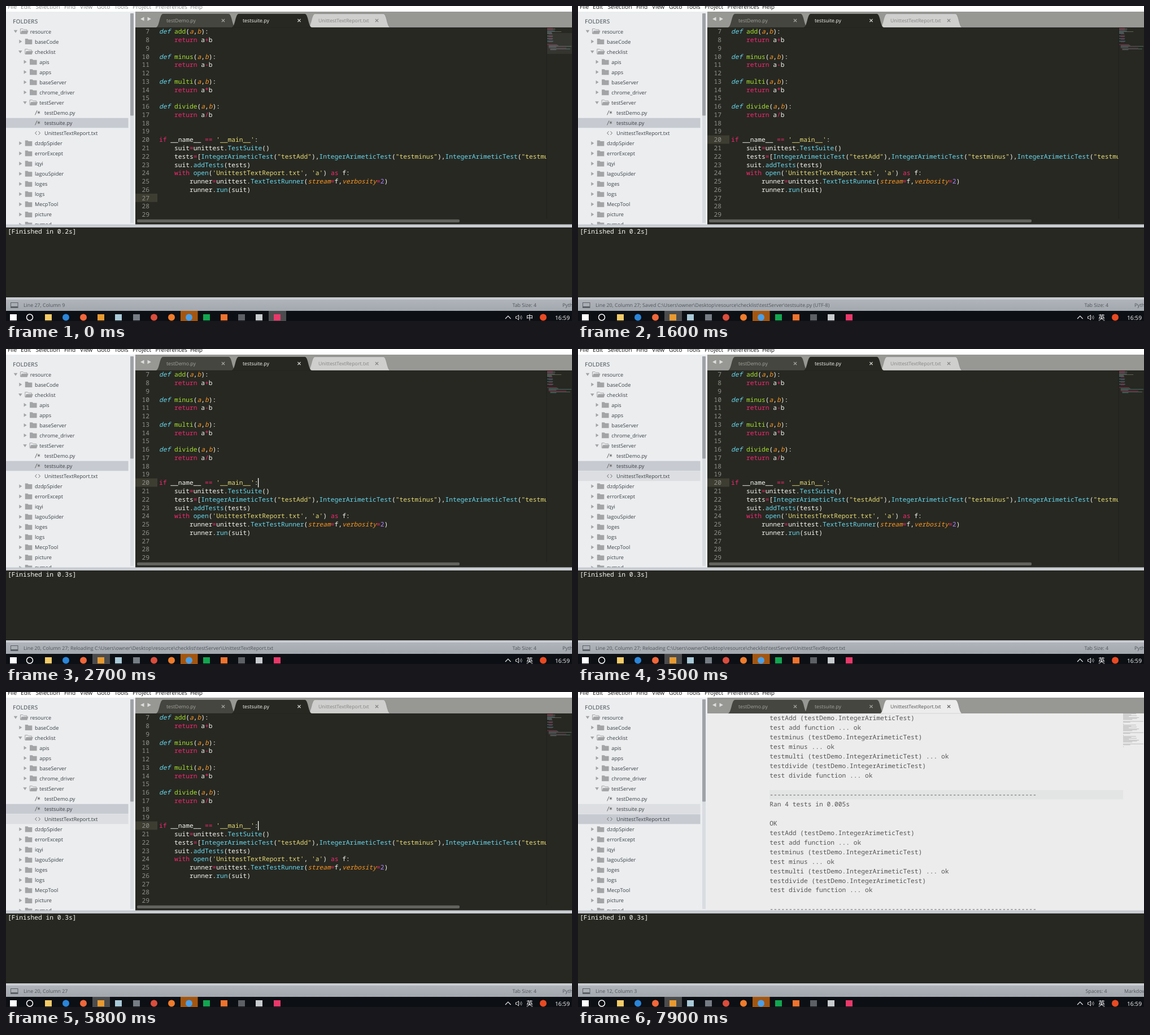
Recreate the animation shown at these times as an HTML page. Size 1002 px wide and 559 px high, loop 8 s.

```html
<!DOCTYPE html>
<html lang="en">
<head>
<meta charset="utf-8">
<title>Editor session</title>
<style>
html, body { margin: 0; width: 100%; height: 100%; overflow: hidden; background: #272822; }
svg { display: block; }
text { white-space: pre; text-rendering: geometricPrecision; font-family: 'Open Sans', 'Noto Sans', sans-serif; }
.mono text { font-family: 'Noto Sans Mono', 'DejaVu Sans Mono', monospace; font-size: 11.25px; }
.code { fill: #f8f8f2; }
.menu { font-size: 10.2px; }
.tree { font-size: 9.2px; fill: #3c4146; }
.tab { font-size: 8.75px; }
.status { font-size: 8.8px; fill: #4f545a; }
.cjk { font-family: 'Noto Sans CJK SC', 'Noto Sans CJK JP', sans-serif; font-size: 12px; font-weight: 500; fill: #fff; }
.k { fill: #f92672; }
.d { fill: #66d9ef; font-style: italic; }
.b { fill: #66d9ef; }
.g { fill: #a6e22e; }
.o { fill: #fd971f; font-style: italic; }
.s { fill: #e6db74; }
.n { fill: #ae81ff; }
</style>
</head>
<body>
<svg id="stage" width="1002" height="559" viewBox="0 0 1002 559"></svg>
<script>
const LOOP = 8000, STEP = 100, CHAR = 6.75;
const rect = (x, y, w, h, fill, more = '') =>
  `<rect x="${x}" y="${y}" width="${w}" height="${h}" fill="${fill}" ${more}/>`;
const circle = (x, y, r, fill, more = '') =>
  `<circle cx="${x}" cy="${y}" r="${r}" fill="${fill}" ${more}/>`;
const path = (d, fill, more = '') => `<path d="${d}" fill="${fill}" ${more}/>`;
const esc = s => s.replace(/&/g, '&amp;').replace(/</g, '&lt;').replace(/>/g, '&gt;');
const text = (x, y, s, more = '') => `<text x="${x}" y="${y}" ${more}>${esc(s)}</text>`;
const group = (id, body, more = '') => `<g id="${id}" ${more}>${body}</g>`;

// Menu bar
const MENU = [['File', 3], ['Edit', 26], ['Selection', 52.5], ['Find', 103], ['View', 131],
  ['Goto', 161], ['Tools', 192], ['Project', 224], ['Preferences', 264.5], ['Help', 326]];
const menu = () => rect(0, 0, 1002, 10, '#fff') +
  group('menu', MENU.map(([s, x]) => text(x, 5.3, s)).join(''), 'class="menu"');

// Sidebar: [level, kind, label]; + open folder, - closed folder, / and < files
const TREE = [
  [0, '+', 'resource'], [1, '-', 'baseCode'], [1, '+', 'checklist'], [2, '-', 'apis'],
  [2, '-', 'apps'], [2, '-', 'baseServer'], [2, '-', 'chrome_driver'], [2, '+', 'testServer'],
  [3, '/', 'testDemo.py'], [3, '/', 'testsuite.py'], [3, '<', 'UnittestTextReport.txt'],
  [1, '-', 'dzdpSpider'], [1, '-', 'errorExcept'], [1, '-', 'iqyi'], [1, '-', 'lagouSpider'],
  [1, '-', 'loges'], [1, '-', 'logs'], [1, '-', 'MecpTool'], [1, '-', 'picture'], [1, '-', 'pymod']];
const ROW = 18.05;

function treeRow([level, kind, label], i) {
  const y = 45 + i * ROW, x = 17 + level * 8.3;
  const name = text(level === 3 ? 68 : x + 25.7, y + 3.5, label);
  if (kind === '/') return path(`M51.5 ${y + 4}l3.6-8`, 'none', 'stroke="#666"') +
    path(`M58 ${y - 3}v5M55.8 ${y - 1.8}l4.4 2.6M60.2 ${y - 1.8}l-4.4 2.6`, 'none', 'stroke="#666" stroke-width=".9"') + name;
  if (kind === '<') return path(`M54.5 ${y - 3}l-3 3 3 3M57.5 ${y - 3}l3 3-3 3`, 'none', 'stroke="#666"') + name;
  const fx = x + 7.5, grey = '#a2a4a6';
  if (kind === '-') return path(`M${x - 2} ${y - 3.3}l5 3.3-5 3.3z`, grey) +
    path(`M${fx + 1} ${y - 5}h4.5l1.5 1.5h6.5v8.500h-12.500z`, grey) + name;
  return path(`M${x - 3.3} ${y - 2.2}h6.600l-3.300 5z`, grey) +
    path(`M${fx + 1} ${y + 4}v-8.500h4.500l1.500 1.500h5.500v2`, 'none', `stroke="${grey}"`) +
    path(`M${fx + 1} ${y + 4.8}l2-6h12l-2 6z`, grey) + name;
}

const sidebar = () => rect(0, 10, 229, 378, '#ebedef') +
  rect(220, 13, 6, 372, '#d9dce0') + rect(220, 13, 6, 181.5, '#9fa3a8', 'rx="1"') +
  rect(0, 0, 216.5, 17.5, '#dcdee1', 'id="hover"') + rect(0, 0, 216.5, 17.5, '#c7cbd1', 'id="picked"') +
  text(12, 31, 'FOLDERS', 'font-size="10.2" font-weight="600" fill="#6a7076"') +
  group('tree', TREE.map(treeRow).join(''), 'class="tree"');

// Tabs
const TABS = [['testDemo.py', 266, 406, 284], ['testsuite.py', 400, 541, 419], ['UnittestTextReport.txt', 535, 680, 553]];
function tab(i, fill, ink, cross) {
  const [label, l, r, x] = TABS[i], cx = [384.5, 519, 656.5][i];
  return path(`M${l} 38C${l + 6} 36 ${l + 6} 14 ${l + 12} 14H${r - 12}C${r - 6} 14 ${r - 6} 36 ${r} 38z`,
    fill, 'stroke="#000" stroke-opacity=".15" stroke-width=".7"') +
    text(x, 29, label, `fill="${ink}"`) +
    path(`M${cx - 2.6} 23.100l5.200 5.200m0-5.200l-5.200 5.200`, 'none', `stroke="${cross}" stroke-width="1.3"`);
}
const strip = rect(229, 10, 773, 28, '#979794') +
  path('M244.500 19.500v7l-6.500-3.500zM250.500 19.500v7l6.500-3.500z', '#dededc');

// Python file, line 7 onwards; {c...} colours a run with class c
const CODE = `{ddef} {gadd}({oa},{ob}):
    {kreturn} a{k+}b

{ddef} {gminus}({oa},{ob}):
    {kreturn} a{k-}b

{ddef} {gmulti}({oa},{ob}):
    {kreturn} a{k*}b

{ddef} {gdivide}({oa},{ob}):
    {kreturn} a{k/}b


{kif} __name__ {k==} {s'__main__'}:
    suit{k=}unittest.{bTestSuite}()
    tests{k=}[{bIntegerArimeticTest}({s"testAdd"}),{bIntegerArimeticTest}({s"testminus"}),{bIntegerArimeticTest}({s"testmulti"})]
    suit.{baddTests}(tests)
    {kwith} {bopen}({s'UnittestTextReport.txt'}, {s'a'}) {kas} f:
        runner{k=}unittest.{bTextTestRunner}({ostream}{k=}f,{overbosity}{k=}{n2})
        runner.{brun}(suit)


`.split('\n').slice(0, 23);
const lineY = n => 45.2 + (n - 7) * 14.77;
const plain = s => s.replace(/\{.([^}]*)\}/g, '$1');

function codeLine(src, i) {
  const y = lineY(i + 7) + 4, pad = src.search(/\S/);
  let out = `<text x="254" y="${y}" text-anchor="end" fill="#8f908a">${i + 7}</text>`;
  if (pad < 0) return out;
  const body = esc(src.trim()).replace(/\{(.)([^}]*)\}/g, '<tspan class="$1">$2</tspan>');
  return out + `<text x="${271 + pad * CHAR}" y="${y}" class="code" clip-path="url(#page)">${body}</text>`;
}

function codeMap() {
  const head = [[0, 15, '#f92672'], [0, 21, '#d0d0c8'], [0, 15, '#f92672'], [0, 20, '#66d9ef'], [0, 37, '#a9a98f'], [0, 12, '#d0d0c8']];
  const tint = { d: '#66d9ef', k: '#f92672' };
  const rows = CODE.map(s => {
    const pad = Math.max(0, s.search(/\S/));
    return [pad, plain(s).trim().length, tint[s.trim()[1]] || '#7fb9b8'];
  });
  return head.concat(rows).map(([pad, len, c], i) => len ?
    rect(958 + pad * .68, 39 + i * 1.53, Math.min(len * .68, 43 - pad * .68), .9, c,
      'opacity=".5" stroke="none"') : '').join('');
}

const darkPage = () => rect(229, 38, 773, 350, '#272822') +
  strip + group('tabsA', tab(0, '#45463f', '#a4a49e', '#a4a49e') + tab(2, '#cfcfce', '#858583', '#858583') +
    tab(1, '#272822', '#f8f8f2', '#d0d0cc'), 'class="tab"') +
  rect(229, 0, 39, 14.8, '#3e3d32', 'id="mark"') +
  group('code', CODE.map(codeLine).join(''), 'class="mono"') +
  rect(956.5, 38, 1, 340, '#20211c') + codeMap() +
  rect(958, 48, 44, 37, '#fff', 'id="view"') +
  rect(232, 378.800, 571, 5.200, '#62635e', 'rx="2"') +
  rect(446, 229, 1.3, 16.5, '#f8f8f0', 'id="caret"');

// Test report
const CASE = 'testDemo.IntegerArimeticTest';
const REPORT = [`testAdd (${CASE})`, 'test add function ... ok', `testminus (${CASE})`, 'test minus ... ok',
  `testmulti (${CASE}) ... ok`, `testdivide (${CASE})`, 'test divide function ... ok', '',
  '-'.repeat(70), 'Ran 4 tests in 0.005s', '', 'OK'];

function lightPage() {
  let lines = '', map = '';
  for (let i = 0; i < 36; i++) {
    const s = REPORT[i % 12];
    if (i < 21) lines += text(339.3, 50.2 + i * 16.96, s);
    map += rect(965, 38.3 + i * 1.67, Math.min(s.length * .6, 36), .8, '#777', 'opacity=".5"');
  }
  return rect(229, 38, 773, 350, '#ececec') + strip +
    group('tabsB', tab(1, '#45463f', '#a4a49e', '#a4a49e') + tab(0, '#45463f', '#a4a49e', '#a4a49e') +
      tab(2, '#ececec', '#50504e', '#666'), 'class="tab"') +
    rect(339, 174, 626, 16.5, '#e3e4e4') + group('lines', lines, 'class="mono" fill="#555"') + map;
}

// Console, status bar, taskbar
const lower = () => rect(0, 387.5, 1002, 5.5, '#c9cdd2') + rect(0, 393, 1002, 124, '#272822') +
  group('out', text(3, 404, '', 'id="done" class="code"'), 'class="mono"') +
  rect(0, 517, 1002, 4.500, '#c9cdd2') + rect(0, 521, 1002, 20, 'url(#bar)') +
  rect(8.5, 526.500, 12.500, 9, 'none', 'stroke="#5b6066"') + rect(8.500, 533, 12.500, 2.500, '#5b6066') +
  group('info', text(31, 534.4, '', 'id="place"') + text(896.5, 534.4, '', 'id="indent"') +
    text(985, 534.4, '', 'id="lang"'), 'class="status"');

const ICONS = [['s', 13, '#fff'], ['s', 75, '#f3cc68'], ['c', 106, '#2a86da'],
  ['c', 137, '#f2673a'], ['s', 168, '#e89a30'], ['s', 199, '#a9cad8'], ['s', 231, '#777d85'],
  ['c', 262, '#dc4d3c'], ['c', 293, '#f07c2c'], ['c', 324, '#4a9fe8'], ['s', 355, '#12a650'],
  ['s', 386, '#f0732d'], ['s', 417, '#5d6064'], ['s', 448, '#c9cccf'], ['s', 480, '#e9386a'], ['c', 951, '#ea4a22']];
const taskbar = () => rect(0, 541, 1002, 18, '#0c0f14') +
  rect(0, 541, 31, 18, '#4b4c4e', 'id="active"') + rect(309, 541, 30.5, 18, '#a4560f') +
  circle(42, 552.5, 5.5, 'none', 'stroke="#fff" stroke-width="1.5"') +
  ICONS.map(([kind, x, c]) => kind === 'c' ? circle(x, 552.5, 6, c) : rect(x - 6, 547, 12, 11, c)).join('') +
  path('M884 555l4.800-4.800 4.800 4.800', 'none', 'stroke="#e8e8e8" stroke-width="1.2"') +
  path('M902.500 551h2l3-2.500v8.500l-3-2.500h-2z', 'none', 'stroke="#e0e0e0"') +
  path('M910 550.500q1.500 2 0 4.500M912 549q2.600 3.700 0 7.500', 'none', 'stroke="#bbb" stroke-width=".9"') +
  text(921, 557, '', 'id="ime" class="cjk"') +
  text(972, 556.5, '16:59', 'font-size="10.2" fill="#fff"');

document.getElementById('stage').innerHTML =
  '<defs><clipPath id="page"><rect x="229" y="38" width="728" height="350"/></clipPath>' +
  '<linearGradient id="bar" x2="0" y2="1"><stop stop-color="#b0b4ba"/><stop offset="1" stop-color="#a3a8af"/></linearGradient></defs>' +
  sidebar() + group('dark', darkPage()) + group('light', lightPage()) + menu() + lower() + taskbar();

// Timelines: [start in ms, value held from there]
const DIR = 'C:\\Users\\owner\\Desktop\\resource\\checklist\\testServer\\';
const HERE = 'Line 20, Column 27';
const PLACE = [[0, 'Line 27, Column 9'], [700, HERE], [1600, `${HERE}; Saved ${DIR}testsuite.py (UTF-8)`],
  [2200, `${HERE}; Reloading ${DIR}UnittestTextReport.txt`], [5800, HERE], [5900, 'Line 12, Column 3']];
const DONE = [[0, '[Finished in 0.2s]'], [2000, ''], [2300, '[Finished in 0.3s]']];
const HOVER = [[0, -1], [2900, 11], [3500, 10], [5900, -1], [7900, 9]];
const VIEW = [[0, .06], [200, .04], [300, .02], [400, 0]];
const CARET = [[0, 0], [700, 1], [1100, .66], [1200, .33], [1300, 0], [1700, .5], [1800, 1],
  [2100, .66], [2200, .33], [2300, 0], [2700, 1], [3100, .4], [3200, 0], [3700, 1], [4100, .4],
  [4200, 0], [4600, .5], [4700, 1], [5100, 0], [5600, .5], [5700, 1]];
const at = (list, t) => list.filter(e => e[0] <= t).pop()[1];

const $ = id => document.getElementById(id);
const set = (id, name, v) => $(id).setAttribute(name, v);
const say = (id, s) => { if ($(id).textContent !== s) $(id).textContent = s; };
const show = (id, on) => set(id, 'display', on ? 'inline' : 'none');
const rowTop = i => 45 + i * ROW - 8.7;

function draw(ms) {
  const t = Math.floor(ms / STEP) * STEP, report = t >= 5900, focus = t >= 700, row = at(HOVER, t);
  show('dark', !report);
  show('light', report);
  set('menu', 'fill', focus ? '#111' : '#858585');
  set('mark', 'y', lineY(focus ? 20 : 27) - 7.6);
  set('view', 'opacity', at(VIEW, t));
  set('caret', 'opacity', at(CARET, t));
  set('picked', 'y', rowTop(report ? 10 : 9));
  show('hover', row >= 0);
  set('hover', 'y', rowTop(row));
  set('active', 'x', t >= 800 ? 153 : 465);
  say('ime', t >= 800 ? '英' : '中');
  say('done', at(DONE, t));
  say('place', at(PLACE, t));
  say('indent', report ? 'Spaces: 4' : 'Tab Size: 4');
  set('indent', 'x', report ? 898.5 : 896.5);
  say('lang', report ? 'Markdown' : 'Python');
  set('lang', 'x', report ? 967 : 985);
}

const start = performance.now();
function tick() {
  draw((performance.now() - start) % LOOP);
  requestAnimationFrame(tick);
}
tick();
</script>
</body>
</html>
```
